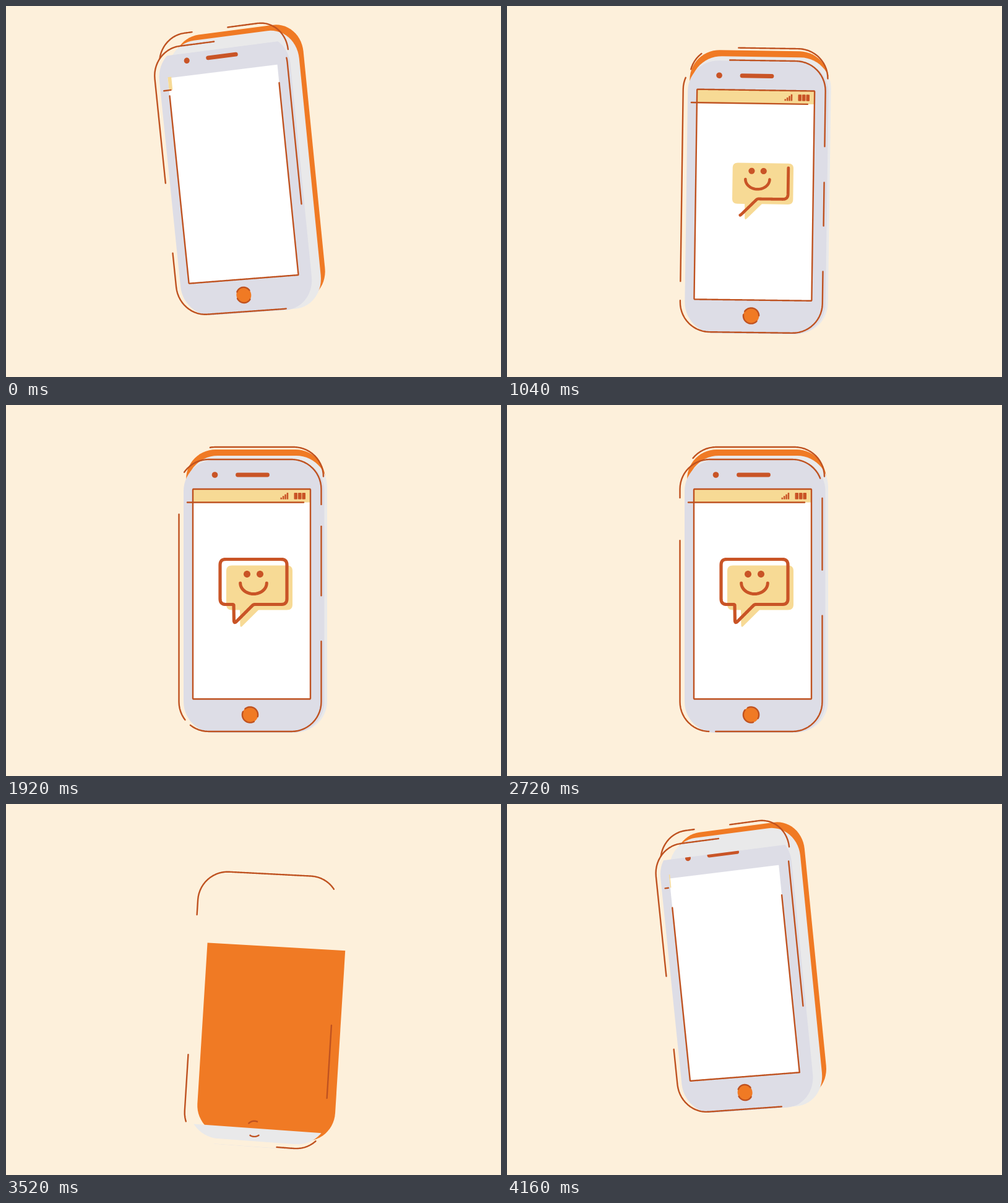
Animation of 800x600 px, one loop 4200 ms. Source, as an HTML page with a canvas:

```html
<!DOCTYPE html>
<html lang="en">
<head>
<meta charset="utf-8">
<title>Phone message</title>
<style>
html, body { margin: 0; width: 100%; height: 100%; overflow: hidden; background: #fdf0db; }
canvas { display: block; }
</style>
</head>
<body>
<canvas id="stage" width="800" height="600"></canvas>
<script>
const ctx = document.getElementById('stage').getContext('2d');
const LOOP = 4200, ENTER = 2760, STEP = 40;
const C = {
  bg: '#fdf0db', orange: '#f07a24', side: '#e9e9ea', front: '#dddde6',
  line: '#bf5220', bold: '#c95426', pale: '#f7da95', white: '#ffffff'
};

const ramp = (t, start, dur) => Math.max(0, Math.min(1, (t - start) / dur));
const inOut = p => p < 0.5 ? 4 * p ** 3 : 1 - 4 * (1 - p) ** 3;
const outCubic = p => 1 - (1 - p) ** 3;

// Swings smoothly from one turning point [time, value] to the next.
function sway(t, ...turns) {
  return turns.reduce((value, [time, next], i) => {
    if (i === 0) return next;
    const p = ramp(t, turns[i - 1][0], time - turns[i - 1][0]);
    return value + (next - turns[i - 1][1]) * p * p * (3 - 2 * p);
  }, 0);
}

// ---- Paths in resting phone coordinates ----
function arc(cx, cy, r, from = 0, to = 360, n = 32) {
  return Array.from({ length: n + 1 }, (_, i) => {
    const a = (from + (to - from) * i / n) * Math.PI / 180;
    return [cx + r * Math.cos(a), cy + r * Math.sin(a)];
  });
}

const rect = (x, y, w, h) => [[x, y], [x + w, y], [x + w, y + h], [x, y + h]];

// Clockwise, starting at the left end of the top edge.
function roundRect(x, y, w, h, r) {
  const centres = rect(x + r, y + r, w - 2 * r, h - 2 * r);
  const [tl, tr, br, bl] = centres.map(([cx, cy], k) => arc(cx, cy, r, 180 + 90 * k, 270 + 90 * k, 14));
  return [[x + r, y], ...tr, ...br, ...bl, ...tl];
}

// Closed polygon of [x, y, rounding].
function softPoly(verts) {
  const pts = [], n = verts.length;
  const toward = (a, b) => {
    const k = a[2] / Math.hypot(b[0] - a[0], b[1] - a[1]);
    return [a[0] + (b[0] - a[0]) * k, a[1] + (b[1] - a[1]) * k];
  };
  verts.forEach((v, i) => {
    const p = toward(v, verts[(i + n - 1) % n]), q = toward(v, verts[(i + 1) % n]);
    for (let u = 0; u <= 1; u += 0.125) {
      const w = 1 - u;
      pts.push([0, 1].map(k => w * w * p[k] + 2 * u * w * v[k] + u * u * q[k]));
    }
  });
  return [...pts, pts[0]];
}

function measure(pts) {
  const acc = [0];
  for (let i = 1; i < pts.length; i++)
    acc[i] = acc[i - 1] + Math.hypot(pts[i][0] - pts[i - 1][0], pts[i][1] - pts[i - 1][1]);
  const len = acc[acc.length - 1];
  const at = s => {
    s = ((s % len) + len) % len;
    let i = 1;
    while (i < acc.length - 1 && acc[i] < s) i++;
    const k = (s - acc[i - 1]) / (acc[i] - acc[i - 1] || 1);
    return [0, 1].map(j => pts[i - 1][j] + (pts[i][j] - pts[i - 1][j]) * k);
  };
  return { len, at };
}

function slice(path, a, b) {
  const out = [];
  for (let s = a; s < b; s += 1.5) out.push(path.at(s));
  return [...out, path.at(b)];
}

const outline = measure(roundRect(279.5, 88, 230, 440, 48));
const backLine = measure(roundRect(290, 68, 223, 400, 48));
const frame = measure([[397, 475.5], [302, 475.5], [302, 136], [492, 136], [492, 475.5], [397, 475.5]]);

// Speech bubble with a tail that drops from its lower left.
const bubble = (left, top, right, bottom, join, tail, tip, depth, soft) => softPoly([
  [right, top, 9], [right, bottom, 9], [join, bottom, soft], [tip, bottom + depth, 5.5],
  [tail, bottom, 1], [left, bottom, 9], [left, top, 9]
]);
const bubbleFill = bubble(356, 259.5, 463, 331.5, 408, 378, 378.5, 29.5, 1);
const bubbleLine = measure(bubble(346, 249.5, 454, 322.5, 400, 368, 368.5, 31.5, 2));

// ---- Projection: a swinging card that also turns about its upright axis ----
let pose;

function setPose(t) {
  const depth = sway(t, [300, 0], [1420, 23], [2080, -21], [2600, 2], [3200, 0]);
  const angle = sway(t, [300, 9], [1420, -5.8], [2150, 2.6], [2800, -0.9], [3280, 0]) * Math.PI / 180;
  pose = {
    depth,
    x: sway(t, [300, 443], [1440, 367], [2130, 411], [2800, 390], [3280, 397]),
    y: sway(t, [100, 395], [1380, 272], [2060, 317.5], [2500, 305.75]),
    cos: Math.cos(angle),
    sin: Math.sin(angle),
    narrow: Math.sqrt(1 - (depth / 65) ** 2),
    twist: depth * 0.36
  };
}

function place([px, py]) {
  const x = (px - 397) * pose.narrow, y = py - 305.75;
  const skew = pose.twist * (px - 397) / 190 * y / 339.5;
  return [pose.x + x * pose.cos - y * pose.sin, pose.y + x * pose.sin + y * pose.cos + skew];
}

// ---- Drawing ----
function lay(pts) {
  ctx.beginPath();
  pts.forEach(p => ctx.lineTo(...place(p)));
}

function fill(pts, color) {
  lay(pts);
  ctx.closePath();
  ctx.fillStyle = color;
  ctx.fill();
}

function stroke(pts, width = 2.4, color = C.line) {
  lay(pts);
  ctx.lineWidth = width;
  ctx.strokeStyle = color;
  ctx.stroke();
}

function dash(path, a, b) {
  if (b - a > 1) stroke(slice(path, a, b));
}

// Reveals what paint() draws from the bottom up.
function wipe(p, top, bottom, paint) {
  if (p <= 0) return;
  ctx.save();
  if (p < 1) {
    lay(rect(200, bottom + (top - bottom) * p, 400, 600));
    ctx.clip();
  }
  paint();
  ctx.restore();
}

function drawLayers(t) {
  const { depth } = pose, late = 1 - ramp(t, 760, 600);
  wipe(inOut(ramp(t, 237, 897)), 72, 530, () =>
    fill(roundRect(291 + depth, 72 + Math.abs(depth) * 0.08, 225, 442, 48), C.orange));
  wipe(inOut(ramp(t, 533, 897)), 70, 530, () =>
    fill(roundRect(292 + depth / 2 - 10 * late, 82 - 8 * late, 227, 447, 50), C.side));
  wipe(inOut(ramp(t, 713, 897)), 89, 530, () => {
    fill(roundRect(287, 89, 227.5, 441, 50), C.front);
    fill(arc(337.5, 113, 4.8), C.bold);
    stroke([[374.5, 113], [422.5, 113]], 6.8, C.bold);
    fill(arc(394.5, 501, 12.8), C.orange);
  });
  wipe(inOut(ramp(t, 880, 625)), 136, 475.5, () =>
    fill(rect(302, 136, 190, 339.5), C.white));
}

function drawScreen(t) {
  const bar = inOut(ramp(t, 1330, 550));
  if (bar > 0) fill(rect(302, 136, 190 * bar, 21.5), C.pale);
  for (let i = 0; i < 4; i++) {
    const h = (2.8 + 2.6 * i) * inOut(ramp(t, 1640 + i * 30, 200));
    if (h > 0) fill(rect(443.5 + 3.4 * i, 152.5 - h, 2.5, h), C.bold);
  }
  for (let i = 0; i < 3; i++) {
    const h = 10.5 * inOut(ramp(t, 1680 + i * 40, 200));
    if (h > 2) fill(roundRect(465.5 + 6.5 * i, 152.5 - h, 5.5, h, 1), C.bold);
  }
  const run = frame.len / 2 * (1 - (1 - ramp(t, 974, 909)) ** 2);
  dash(frame, -run, run);
  const rule = 188 * inOut(ramp(t, 1260, 714));
  if (rule > 1) stroke([[293, 157.5], [293 + rule, 157.5]]);
}

// Three dashes slide along the outline and wrap across one fixed gap,
// while the whole pattern drifts round the phone.
function drawOutline(t) {
  const left = LOOP - 40 - t, begin = 414 + 0.052 * left, len = outline.len - 74;
  const rest = (Math.max(0, 3900 - t) / 3140) ** 3;
  const grow = ramp(t, 60, 400);
  const run = (a, b) => {
    b = a + (b - a) * grow;
    if (b <= a) return;
    const turn = Math.floor(a / len) * len;
    dash(outline, begin + a - turn, begin + Math.min(b - turn, len));
    dash(outline, begin, begin + b - turn - len);
  };
  run(-116 + 346 * rest ** 0.85, 339);
  run(350 + 217 * rest, 685 + 160 * rest);
  run(754 + 312 * rest, 1035 + 215 * rest);

  // Rear edge: one sliding gap.
  const edge = 32 + 0.0435 * left, show = ramp(t, 800, 500);
  dash(backLine, -63, -63 + (edge - 74) * show);
  dash(backLine, 202 - (277 - edge) * show, 202);
}

function drawRing(t) {
  const mid = -105 + 0.018 * (t - 760);
  const half = (34 + 38 * ramp(t, 760, 1000)) * ramp(t, 480, 280);
  if (half < 2) return;
  for (const a of [mid, mid + 190]) stroke(arc(394.5, 501, 12.6, a - half, a + half));
}

function drawBubble(t) {
  const k = outCubic(ramp(t, 2060, 740)), off = 1 - k;
  if (k < 0.01) return;
  const pop = pts => pts.map(([x, y]) =>
    [409.5 + (x - 409.5) * k + 12 * off, 295 + (y - 295) * k - 105 * off]);
  fill(pop(bubbleFill), C.pale);
  const half = bubbleLine.len / 2 * inOut(ramp(t, 2200, 614));
  if (half > 1) stroke(pop(slice(bubbleLine, 97 - half, 97 + half)), 5.2 * k, C.bold);
  for (const x of [389.5, 410.5]) fill(pop(arc(x, 273.5, 5.5)), C.bold);
  const smile = arc(0, 0, 1, 180, 0).map(([x, y]) => [400 + 21.3 * x, 288 + 17.5 * y]);
  stroke(pop(smile), 5 * k, C.bold);
}

function draw(t) {
  ctx.fillStyle = C.bg;
  ctx.fillRect(0, 0, 800, 600);
  if (t < 80) return;
  ctx.lineCap = ctx.lineJoin = 'round';
  setPose(t);
  drawLayers(t);
  drawScreen(t);
  drawOutline(t);
  drawRing(t);
  drawBubble(t);
}

function tick() {
  const t = Math.floor(performance.now() % LOOP / STEP) * STEP;
  draw((t + LOOP - ENTER) % LOOP);
  requestAnimationFrame(tick);
}
tick();
</script>
</body>
</html>
```
